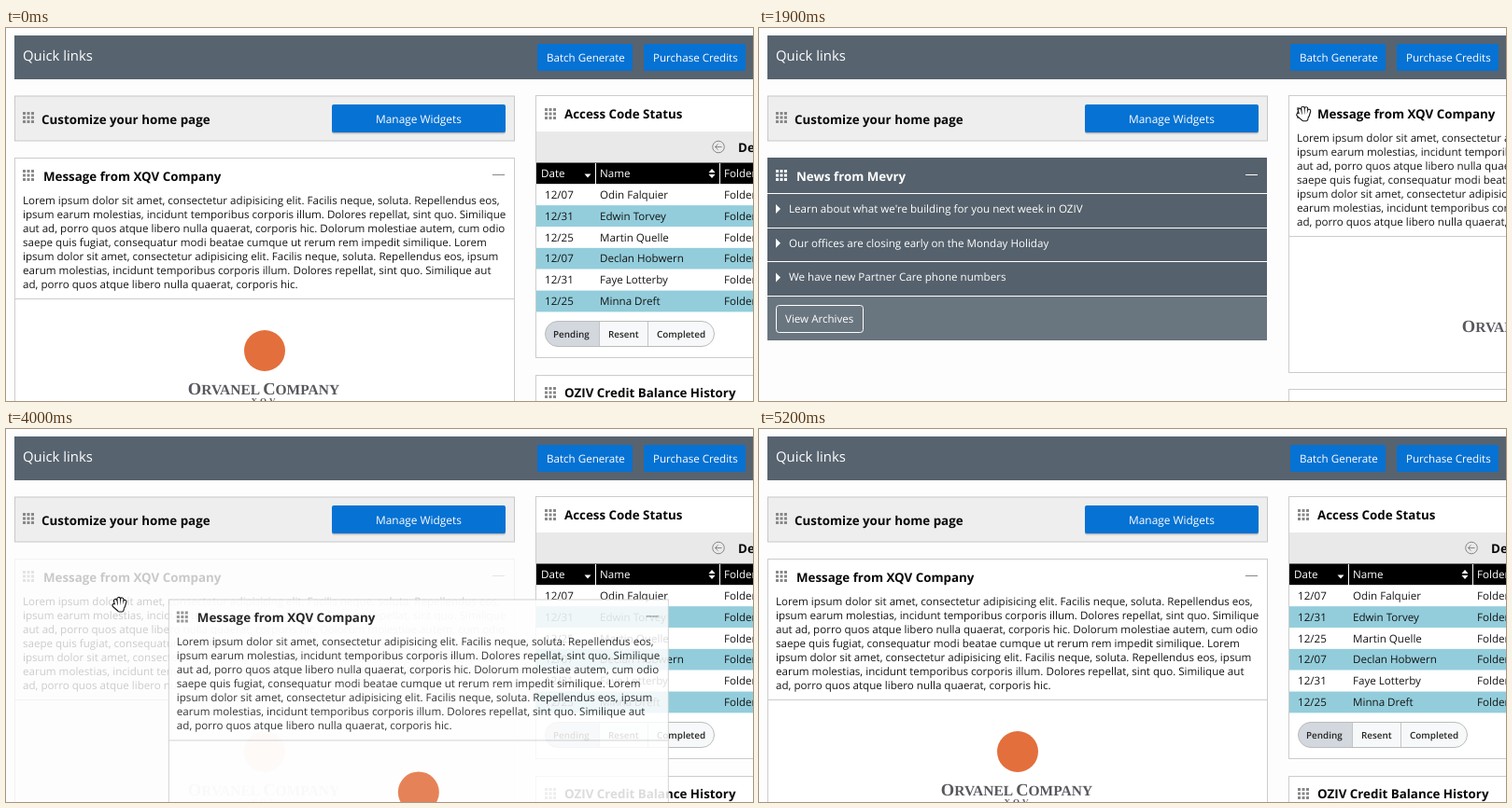
An HTML page that plays this animation: 800x400 px, repeating every 5300 ms.

```html
<!DOCTYPE html>
<html lang="en">
<head>
<meta charset="utf-8">
<title>Dashboard widgets</title>
<style>
  html, body { margin: 0; height: 100%; overflow: hidden; background: #fdfdfd; }
  svg { display: block; width: 100vw; height: 100vh; }
  text { font: 11.6px "Open Sans", "Noto Sans", sans-serif; text-rendering: geometricPrecision; fill: #151515; }
  .title { font-size: 13.35px; font-weight: 700; fill: #080808; }
  .light text { fill: #fff; }
  .light { fill: #fff; }
  .pill { font-size: 9.9px; font-weight: 600; fill: #222; }
  .panel { fill: #fff; stroke: #ccc; }
  .button { fill: #0672d3; }
  .grip { stroke: #888; }
  .light .grip { stroke: #fff; }
  .brand { font: 700 15.5px "Liberation Serif", serif; fill: #58585e; text-anchor: middle; }
  .cap { font-size: 18.5px; }
  .small { font-size: 9px; letter-spacing: 3px; }
  .ink, .skin { stroke-linecap: round; stroke-linejoin: round; }
  .ink { stroke: #111; fill: #111; stroke-width: 4.6; }
  .skin { stroke: #fff; fill: #fff; stroke-width: 2.4; }
</style>
</head>
<body>
<svg viewBox="0 0 800 400">
  <defs>
    <path id="grip" d="M0 1.5h12M0 6h12M0 10.5h12" stroke-width="3" stroke-dasharray="3 1.5"/>
    <path id="openHand" d="M-2.5 2-4-4M0 1-.5-6M2.5 1 3-5.5M4.5 2 6-3M-1 5-5.5 1M-1 2h5l-1 4h-3z"/>
    <path id="pointHand" transform="translate(3 5)" d="M-2 3V-7M.5 2v-3M3 2v-2.5M5 3v-2M-2 5l-3-3.5M-1 3h5l-1 5h-3z"/>
    <g id="message">
      <rect class="panel" x="9.5" y="139.5" width="535" height="297"/>
      <path d="M9 290.5h535" stroke="#ccc"/>
      <use class="grip" href="#grip" x="18" y="152"/>
      <text class="title" x="40" y="164">Message from XQV Company</text>
      <path d="M521 157.5h13" stroke="#888"/>
      <g id="lorem"></g>
      <circle cx="277" cy="346" r="22" fill="#e36f3c"/>
      <text class="brand" x="276" y="393"><tspan class="cap">O</tspan>RVANEL <tspan class="cap">C</tspan>OMPANY</text>
      <text class="brand small" x="277" y="403">XQV</text>
    </g>
  </defs>

  <rect width="800" height="400" fill="#fdfdfd"/>
  <rect x="9" y="8" width="791" height="47" fill="#57636f"/>
  <g class="light">
    <text x="18" y="34.5" style="font-size:14.9px">Quick links</text>
    <rect class="button" x="569" y="17" width="102" height="29" rx="2"/>
    <rect class="button" x="683" y="17" width="109" height="29" rx="2"/>
    <text x="579" y="35.5">Batch Generate</text>
    <text x="693" y="35.5">Purchase Credits</text>
  </g>

  <rect x="9.5" y="73" width="535" height="48" fill="#eee" stroke="#c8c8c8"/>
  <use class="grip" href="#grip" x="18" y="90"/>
  <text class="title" x="38" y="103">Customize your home page</text>
  <g class="light">
    <rect x="349" y="83.5" width="186" height="30" rx="2" fill="#bbb"/>
    <rect class="button" x="349" y="82" width="186" height="30" rx="2"/>
    <text x="396" y="101.5" style="font-size:11.9px">Manage Widgets</text>
  </g>

  <g id="news" class="light">
    <rect x="9" y="139" width="535" height="149" fill="#55616c"/>
    <rect x="9" y="288" width="535" height="47" fill="#69757f"/>
    <use class="grip" href="#grip" x="18" y="152"/>
    <text class="title" x="40" y="164">News from Mevry</text>
    <path d="M521 157.5h13" stroke="#fff"/>
    <g id="headlines"></g>
    <rect x="18.5" y="297.5" width="93" height="29" rx="3" fill="none" stroke="#fff"/>
    <text x="28" y="316">View Archives</text>
  </g>

  <g id="column">
    <rect class="panel" x="567.5" y="72.5" width="300" height="281"/>
    <use class="grip" href="#grip" x="577" y="86"/>
    <text class="title" x="598" y="97">Access Code Status</text>
    <rect x="568" y="111" width="232" height="34" fill="#e9e9e9"/>
    <g fill="none" stroke="#888">
      <circle cx="763" cy="127.5" r="6.3"/>
      <path d="M766.5 127.5h-7m3-3l-3 3 3 3"/>
    </g>
    <text class="title" x="784" y="132.5">Default</text>
    <rect x="568" y="144.5" width="232" height="23"/>
    <g class="light">
      <text x="573" y="160">Date</text>
      <text x="636" y="160">Name</text>
      <text x="769" y="160">Folder</text>
      <path d="M619.5 156.5h7l-3.5 4zM752.5 155h7l-3.5-4zm0 2h7l-3.5 4z"/>
      <path d="M631.5 145v23M764.5 145v23" stroke="#fff"/>
    </g>
    <g id="rows"></g>
    <rect x="577.5" y="314.5" width="181" height="27" rx="13.5" fill="#f7f8f9"/>
    <path d="M635 314.5h-44a13.5 13.5 0 0 0 0 27h44z" fill="#d3d7de"/>
    <path d="M635.5 314v27M687.5 314v27" stroke="#c4c4c4"/>
    <rect x="577.5" y="314.5" width="181" height="27" rx="13.5" fill="none" stroke="#bbb"/>
    <text class="pill" x="586" y="331.5">Pending</text>
    <text class="pill" x="645" y="331.5">Resent</text>
    <text class="pill" x="697" y="331.5">Completed</text>
    <rect class="panel" x="567.5" y="372.5" width="300" height="200"/>
    <use class="grip" href="#grip" x="577" y="385"/>
    <text class="title" x="598" y="396">OZIV Credit Balance History</text>
  </g>

  <use id="ghost" href="#message"/>
  <use id="dragged" href="#message"/>
  <g id="cursor"><use class="ink"/><use class="skin"/></g>
</svg>

<script>
const $ = id => document.getElementById(id);
const label = (x, y, s) => `<text x="${x}" y="${y}">${s}</text>`;
const fill = (id, items, render) => $(id).innerHTML = items.map(render).join('');

fill('lorem', [
  'Lorem ipsum dolor sit amet, consectetur adipisicing elit. Facilis neque, soluta. Repellendus eos,',
  'ipsum earum molestias, incidunt temporibus corporis illum. Dolores repellat, sint quo. Similique',
  'aut ad, porro quos atque libero nulla quaerat, corporis hic. Dolorum molestiae autem, cum odio',
  'saepe quis fugiat, consequatur modi beatae cumque ut rerum rem impedit similique. Lorem',
  'ipsum dolor sit amet, consectetur adipisicing elit. Facilis neque, soluta. Repellendus eos, ipsum',
  'earum molestias, incidunt temporibus corporis illum. Dolores repellat, sint quo. Similique aut',
  'ad, porro quos atque libero nulla quaerat, corporis hic.'
], (line, i) => label(18, 189 + i * 14.95, line));

fill('headlines', [
  "Learn about what we're building for you next week in OZIV",
  'Our offices are closing early on the Monday Holiday',
  'We have new Partner Care phone numbers',
  ''
], (line, i) => {
  const y = 177.5 + i * 36.7;
  const arrow = line && `<path d="M18 ${y + 11.5}l5 5-5 5z"/>`;
  return `<path d="M9 ${Math.floor(y) + .5}h535" stroke="#fff"/>` + arrow + label(32, y + 20.5, line);
});

const dates = ['12/07', '12/31', '12/25'];
fill('rows', ['Odin Falquier', 'Edwin Torvey', 'Martin Quelle', 'Declan Hobwern', 'Faye Lotterby', 'Minna Dreft'],
  (name, i) => {
    const y = 167.3 + i * 22.85;
    return `<rect x="568" y="${y}" width="232" height="22.85" fill="${i % 2 ? '#93cddb' : '#fff'}"/>`
      + label(577, y + 15.5, dates[i % 3]) + label(636, y + 15.5, name) + label(769, y + 15.5, 'Folder');
  });

const LOOP = 5300, STEP = 100, LEAD = 100;
const ramp = (from, to, t) => Math.min(1, Math.max(0, (t - from) / (to - from)));

// Share of the drag done: 0 in the left column, 1 in the right one.
const dragged = t => t < 2800 ? ramp(1300, 1900, t) ** 1.2 : (1 - ramp(3600, 4350, t)) ** 1.6;

// The drag follows a bowed line, deeper on the way back.
function offset(t) {
  const r = dragged(t), bow = t < 2800 ? 40 : 79;
  return [558 * r, -67 * r + bow * Math.sin(Math.PI * r)];
}

function draw(now) {
  const t = Math.floor(now % LOOP / STEP) * STEP;
  const between = (a, b) => t >= a && t < b;
  const place = (id, x, y) => $(id).setAttribute('transform', `translate(${x} ${y})`);
  const fade = (id, alpha) => $(id).setAttribute('opacity', alpha);

  const r = dragged(t);
  place('dragged', ...offset(t));
  place('column', 0, r > .7 ? 315 : 0);
  fade('dragged', r > 0 && r < 1 ? .86 : 1);
  fade('ghost', r * (1 - r));
  fade('news', ramp(.45, 1, r));

  // The pointer runs ahead of the widget and rests below the stage.
  const [x, y] = offset(t + LEAD);
  const away = 1 - ramp(200, 800, t) + ramp(4300, 4800, t);
  place('cursor', 25 + x + 22 * away, 159 + y + 262 * away);
  const open = between(1000, 2000) || between(3400, 4400);
  for (const hand of $('cursor').children) hand.setAttribute('href', open ? '#openHand' : '#pointHand');

  requestAnimationFrame(draw);
}
draw(0);
</script>
</body>
</html>
```
